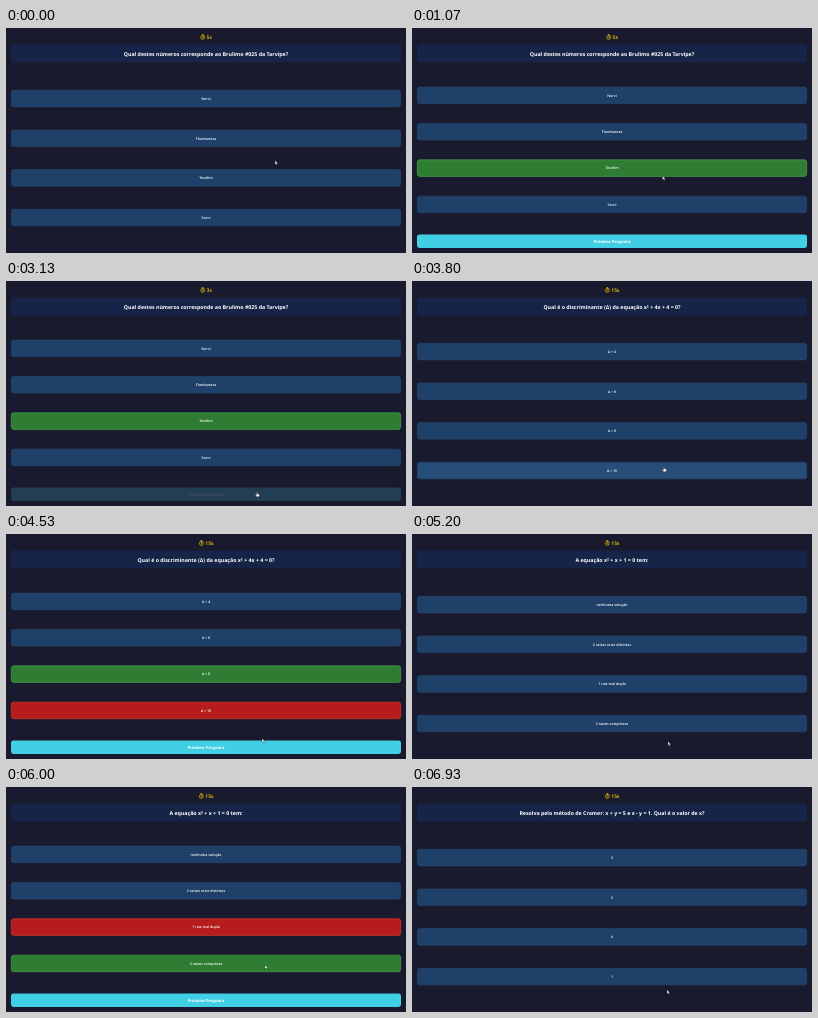
Write an HTML page that moves like this. It is 400 by 225 pixels and loops after 7 s.

```html
<!DOCTYPE html>
<html lang="pt">
<head>
<meta charset="utf-8">
<title>Quiz</title>
<style>
  html, body { margin: 0; width: 100%; height: 100%; overflow: hidden; background: #1a1a2e; }
  svg { display: block; width: 100vw; height: 100vh; }
  text {
    font-family: "Open Sans", "Noto Sans", sans-serif;
    text-anchor: middle; fill: #fff; text-rendering: geometricPrecision;
  }
  .title { font-size: 5.25px; font-weight: 700; }
  .option { font-size: 3.6px; font-weight: 600; }
  .next { font-size: 4.1px; font-weight: 700; }
  .timer { font-size: 5px; font-weight: 600; fill: #ffd700; }
</style>
</head>
<body>
<svg id="stage" viewBox="0 0 400 225"></svg>
<script>
const LOOP = 7000;
const BLUE = [31, 64, 104], HOVER = [39, 78, 120], GREEN = [46, 125, 50], RED = [183, 28, 28];
const EDGE = [39, 73, 109], GREEN_EDGE = [76, 175, 80], RED_EDGE = [229, 57, 53];

const questions = [
  { start: 0, answered: 900, leave: 3110, chosen: 2, correct: 2,
    title: "Qual destes números corresponde ao Brulimo #025 da Tarvipe?",
    options: ["Norvi", "Flumbarosa", "Tovelim", "Sarni"] },
  { start: 3200, answered: 4100, leave: 4870, chosen: 3, correct: 2,
    title: "Qual é o discriminante (Δ) da equação x² + 4x + 4 = 0?",
    options: ["Δ = 4", "Δ = 8", "Δ = 0", "Δ = 16"] },
  { start: 4940, answered: 5700, leave: 6650, chosen: 2, correct: 3,
    title: "A equação x² + x + 1 = 0 tem:",
    options: ["nenhuma solução", "2 raízes reais distintas", "1 raiz real dupla", "2 raízes complexas"] },
  { start: 6735, answered: Infinity, leave: Infinity,
    title: "Resolva pelo método de Cramer: x + y = 5 e x - y = 1. Qual é o valor de x?",
    options: ["3", "2", "4", "1"] }
];

const timerSteps = [[0, "5s"], [1600, "4s"], [2600, "3s"], [3200, "15s"]];

// time, x, y of the pointer tip
const path = [
  [0, 269, 132.5], [70, 269, 132.5], [730, 251, 147.5], [1530, 250, 148.5], [1800, 250, 158],
  [2330, 250, 158], [2870, 251, 211], [3200, 251, 211], [3800, 252, 186], [4150, 253, 187],
  [4530, 256, 204.5], [4700, 256, 211], [4960, 256, 211], [5200, 256, 207.5],
  [5580, 257, 148], [5750, 257, 148], [6000, 259, 178], [6430, 257, 211],
  [6735, 257, 211], [6930, 255, 202.8], [7000, 255, 202.8]
];

const stage = document.getElementById("stage");

function add(tag, attrs, parent = stage) {
  const node = document.createElementNS("http://www.w3.org/2000/svg", tag);
  set(node, attrs);
  parent.append(node);
  return node;
}
function set(node, attrs) {
  for (const key in attrs) node.setAttribute(key, attrs[key]);
}
function write(node, value) {
  if (node.textContent !== value) node.textContent = value;
}
const clamp = v => Math.min(1, Math.max(0, v));
const mix = (a, b, k) => `rgb(${a.map((v, i) => Math.round(v + (b[i] - v) * k))})`;
const lastBefore = (list, t, time) => list.filter(item => time(item) <= t).pop();

add("rect", { width: 400, height: 225, fill: "#1a1a2e" });
add("rect", { x: 5, y: 16.5, width: 390, height: 18, rx: 2.5, fill: "#162447" });
const title = add("text", { class: "title", x: 200, y: 27.6 });

const clock = add("g", { fill: "none", stroke: "#ffd700", "stroke-width": 0.65 });
add("circle", { cy: 9.4, r: 1.9 }, clock);
add("path", { d: "M-.8 6.6H.8M0 6.6V7.5M1.5 7.5l.5-.5M0 8.3V9.5H.8" }, clock);
const timer = add("text", { class: "timer", y: 10.9 });

const buttons = [0, 1, 2, 3].map(() => {
  const group = add("g", {});
  return {
    group,
    box: add("rect", { x: 5.3, y: -8.3, width: 389.4, height: 16.6, rx: 2.4, "stroke-width": 0.6 }, group),
    label: add("text", { class: "option", x: 200, y: 1.3 }, group)
  };
});

const next = add("g", {});
add("rect", { x: 5, y: 206.4, width: 390, height: 13.6, rx: 2.4, fill: "#40cfe4" }, next);
add("text", { class: "next", x: 200, y: 214.6 }, next).textContent = "Próxima Pergunta";

const pointerStyle = { fill: "#fff", stroke: "#111", "stroke-width": 0.3, "stroke-linejoin": "round" };
const arrow = add("path", { d: "M0 0V3.9L.9 3.1L1.5 4.5L2.2 4.2L1.6 2.9H2.8Z", ...pointerStyle });
const hand = add("path", {
  d: "M-.4 .4Q0-.3.4.4V1.7L2 2Q2.5 2.1 2.4 2.7L2 4.7H-.4L-1.6 2.9Q-1.3 2.2-.4 2.9Z", ...pointerStyle
});

function pointerAt(t) {
  const i = Math.max(1, path.findIndex(p => p[0] > t));
  const [a, b] = [path[i - 1], path[i]];
  const k = clamp((t - a[0]) / (b[0] - a[0]));
  const eased = k * k * (3 - 2 * k);
  return [a[1] + (b[1] - a[1]) * eased, a[2] + (b[2] - a[2]) * eased];
}

function draw(t) {
  const question = lastBefore(questions, t, q => q.start);
  const answered = t >= question.answered;
  const reveal = answered ? clamp((t - question.answered) / 150) : 0;
  const [px, py] = pointerAt(t);
  let pointing = answered && py > 206.4;

  write(title, question.title);
  const time = lastBefore(timerSteps, t, s => s[0])[1];
  const wide = time.length > 2;
  write(timer, time);
  set(timer, { x: wide ? 203.4 : 203.2 });
  set(clock, { transform: `translate(${wide ? 195.3 : 196.7} 0)` });

  buttons.forEach(({ group, box, label }, i) => {
    const y = answered ? 67.4 + 36.35 * i : 70.6 + 39.65 * i;
    const hovered = !answered && Math.abs(py - y) < 8.5;
    pointing = pointing || hovered;
    const right = i === question.correct, wrong = i === question.chosen && !right;
    const fill = right ? GREEN : wrong ? RED : BLUE;
    const edge = right ? GREEN_EDGE : wrong ? RED_EDGE : EDGE;
    set(group, { transform: `translate(0 ${y})` });
    set(box, { fill: mix(hovered ? HOVER : BLUE, fill, reveal), stroke: mix(EDGE, edge, reveal) });
    write(label, question.options[i]);
  });

  set(next, { opacity: t >= question.leave ? 0.2 : reveal });
  set(arrow, { transform: `translate(${px} ${py})`, visibility: pointing ? "hidden" : "visible" });
  set(hand, { transform: `translate(${px} ${py})`, visibility: pointing ? "visible" : "hidden" });
}

const began = performance.now();
function tick() {
  draw((performance.now() - began) % LOOP);
  requestAnimationFrame(tick);
}
tick();
</script>
</body>
</html>
```
